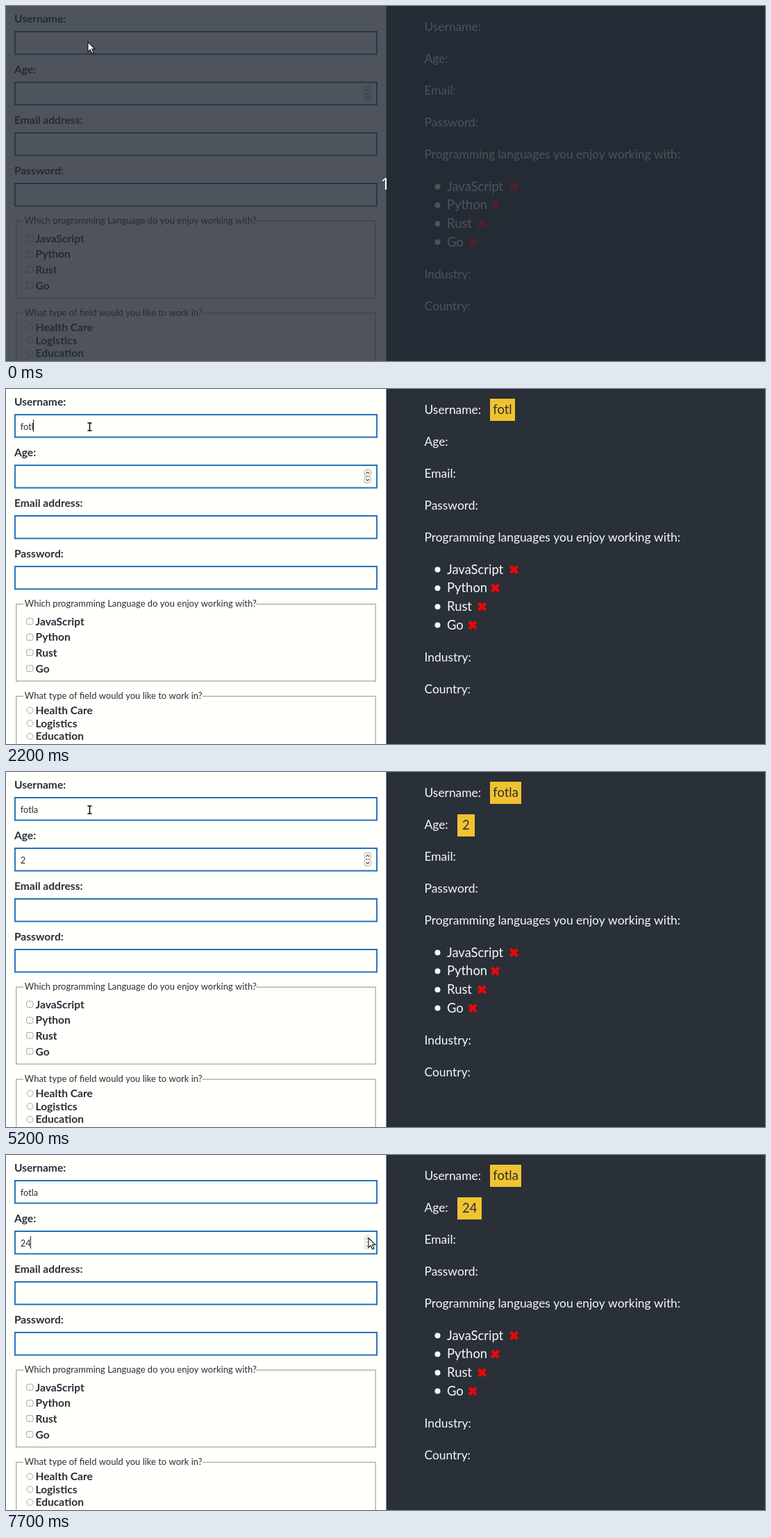
These frames come from a looping animation (1093 px wide and 512 px high, 8000 ms). An HTML page with a canvas:

```html
<!DOCTYPE html>
<html lang="en">
<head>
<meta charset="utf-8">
<title>Live form preview</title>
<style>
  html, body { margin: 0; width: 100%; height: 100%; overflow: hidden; background: #fffffb; }
  canvas { display: block; }
</style>
</head>
<body>
<canvas id="stage" width="1093" height="512"></canvas>
<script>
const ctx = document.getElementById('stage').getContext('2d');
const LOOP = 8000;
const INK = '#2a2f36', PAGE = '#fffffb', PANEL = '#293038', BLUE = '#2370b8', GRAY = '#b3b3b0';
const CHALK = '#f8f8f5', RED = '#ee0606';
const LABEL = '700 15.6px Lato, sans-serif';
const LEGEND = '13px Lato, sans-serif';
const INPUT = '12.8px Lato, sans-serif';
const NOTE = '17.4px Lato, sans-serif';
const ITEM = '18.4px Lato, sans-serif';

const languages = ['JavaScript', 'Python', 'Rust', 'Go'];
const fields = [
  { text: 'fotla', keys: [1500, 1700, 2000, 2200, 2600], caret: [[600, 3000]],
    baseline: 58.5, badge: [697, 14, 4.3] },
  { text: '24', keys: [5000, 6300], caret: [[4200, 5200], [6300, 7300], [7700, LOOP]],
    baseline: 131.5, badge: [650, 61, 7] }
];

function text(str, x, y, font, color) {
  ctx.font = font;
  ctx.fillStyle = color;
  ctx.fillText(str, x, y);
}

function box(x, y, w, h, color, line = 1, radius = 0, fill) {
  ctx.beginPath();
  ctx.roundRect(x + line / 2, y + line / 2, w - line, h - line, radius);
  if (fill) { ctx.fillStyle = fill; ctx.fill(); }
  ctx.lineWidth = line;
  ctx.strokeStyle = color;
  ctx.stroke();
}

function stroke(points, color, width) {
  ctx.beginPath();
  points.forEach(([x, y]) => ctx.lineTo(x, y));
  ctx.strokeStyle = color;
  ctx.lineWidth = width;
  ctx.stroke();
}

function dot(x, y, r, color) {
  ctx.beginPath();
  ctx.arc(x, y, r, 0, 7);
  ctx.fillStyle = color;
  ctx.fill();
}

function fieldset(y, h, legend, gapEnd) {
  box(14, y, 519, h, GRAY, 1.5);
  ctx.fillStyle = PAGE;
  ctx.fillRect(25, y - 3, gapEnd - 25, 7);
  text(legend, 26.8, y + 4.5, LEGEND, INK);
}

function spinner(hovered) {
  ctx.globalAlpha = hovered ? 0.5 : 1;
  for (const [y, dir] of [[116, -1], [126, 1]]) {
    box(515.5, y, 10.5, 10, '#a9a9a6', 1, 3, '#f7f7f4');
    const mid = y + 5;
    stroke([[518.4, mid - dir], [520.8, mid + dir * 1.3], [523.2, mid - dir]], '#444', 1.1);
  }
  ctx.globalAlpha = 1;
}

function form(spinnerHovered) {
  ctx.fillStyle = PAGE;
  ctx.fillRect(0, 0, 548, 512);
  ['Username:', 'Age:', 'Email address:', 'Password:'].forEach((name, i) => {
    text(name, 11.9, 24 + i * 73, LABEL, INK);
    box(12, 36 + i * 73, 523, 34.5, BLUE, 1.9);
  });
  spinner(spinnerHovered);

  fieldset(309.5, 112.5, 'Which programming Language do you enjoy working with?', 360);
  languages.forEach((name, i) => {
    const y = 335 + i * 22.7;
    box(29, Math.round(y) - 5, 10.5, 10, '#aaa', 1, 2.5, '#f8f8f5');
    text(name, 42.5, y + 5.5, LABEL, INK);
  });

  fieldset(442.5, 100, 'What type of field would you like to work in?', 283);
  ['Health Care', 'Logistics', 'Education'].forEach((name, i) => {
    const y = 463.5 + i * 18.7;
    box(29.5, y - 5, 10, 10, '#aaa', 1, 5, '#fcfcf9');
    text(name, 42.5, y + 5.5, LABEL, INK);
  });
}

function preview() {
  ctx.fillStyle = PANEL;
  ctx.fillRect(547.5, 0, 545.5, 512);
  const notes = ['Username:', 'Age:', 'Email:', 'Password:',
    'Programming languages you enjoy working with:'];
  notes.forEach((note, i) => text(note, 602.5, 35.5 + i * 46.2, NOTE, CHALK));
  text('Industry:', 602.5, 392.5, NOTE, CHALK);
  text('Country:', 602.5, 439, NOTE, CHALK);

  const crossX = [731.5, 704.5, 685.5, 672];
  languages.forEach((name, i) => {
    const y = 260.5 + i * 26.7, x = crossX[i], r = 5;
    dot(621.5, y, 4, CHALK);
    text(name, 635, y + 6, ITEM, CHALK);
    stroke([[x - r, y - r], [x + r, y + r]], RED, 4.5);
    stroke([[x + r, y - r], [x - r, y + r]], RED, 4.5);
  });
}

function typedField({ text: full, keys, caret, baseline, badge: [x, y, pad] }, t) {
  const typed = full.slice(0, keys.filter(k => k <= t).length);
  text(typed, 20.8, baseline, INPUT, INK);
  const caretX = 20 + Math.round(ctx.measureText(typed).width);
  if (caret.some(([from, to]) => t >= from && t < to)) {
    ctx.fillStyle = '#222';
    ctx.fillRect(caretX, Math.floor(baseline) - 14, 1, 18);
  }
  if (!typed) return;
  ctx.font = ITEM;
  ctx.fillStyle = '#f0c330';
  ctx.fillRect(x, y, Math.round(ctx.measureText(typed).width + pad * 2), 32);
  text(typed, x + pad, y + 22, ITEM, PANEL);
}

function arrow(x, y) {
  ctx.beginPath();
  [[0, 0], [0, 14], [3.3, 11], [5.6, 16.3], [8, 15.2], [5.7, 10], [10, 10]]
    .forEach(([dx, dy]) => ctx.lineTo(x + dx, y + dy));
  ctx.closePath();
  ctx.fillStyle = '#fff';
  ctx.fill();
  ctx.strokeStyle = '#111';
  ctx.lineWidth = 1.1;
  ctx.stroke();
}

function beam(x, y) {
  for (const [color, width] of [['#fff', 3.5], ['#111', 1.6]]) {
    stroke([[x - 3, y - 5.5], [x + 3, y - 5.5]], color, width);
    stroke([[x - 3, y + 5.5], [x + 3, y + 5.5]], color, width);
    stroke([[x, y - 5.5], [x, y + 5.5]], color, width);
  }
}

// The pointer advances in 100 ms steps along two eased legs.
function pointerAt(t) {
  const leg = (start, steps) => {
    const p = Math.max(0, Math.min(1, (Math.floor((t - start) / 100) + 1) / steps));
    return p * p * (3 - 2 * p);
  };
  const a = leg(6800, 4), b = leg(7300, 5);
  return [(t < 1200 ? 119.5 : 120.5) + 276 * a + 125.5 * b, 54.5 + 69 * a - 4 * b];
}

function draw(t) {
  const [x, y] = pointerAt(t);
  const overSpinner = x > 514;
  form(overSpinner);
  preview();
  fields.forEach(field => typedField(field, t));

  if (t < 200) {
    ctx.fillStyle = 'rgba(36, 42, 53, .8)';
    ctx.fillRect(0, 0, 1093, 512);
    text('1', 539.5, 265, '24px "Noto Sans", sans-serif', '#fff');
    arrow(118, 52);
    return;
  }
  const overInput = y > 36 && (y - 36) % 73 < 34;
  (overInput && !overSpinner ? beam : arrow)(x, y);
}

function tick() {
  draw(performance.now() % LOOP);
  requestAnimationFrame(tick);
}
tick();
</script>
</body>
</html>
```
